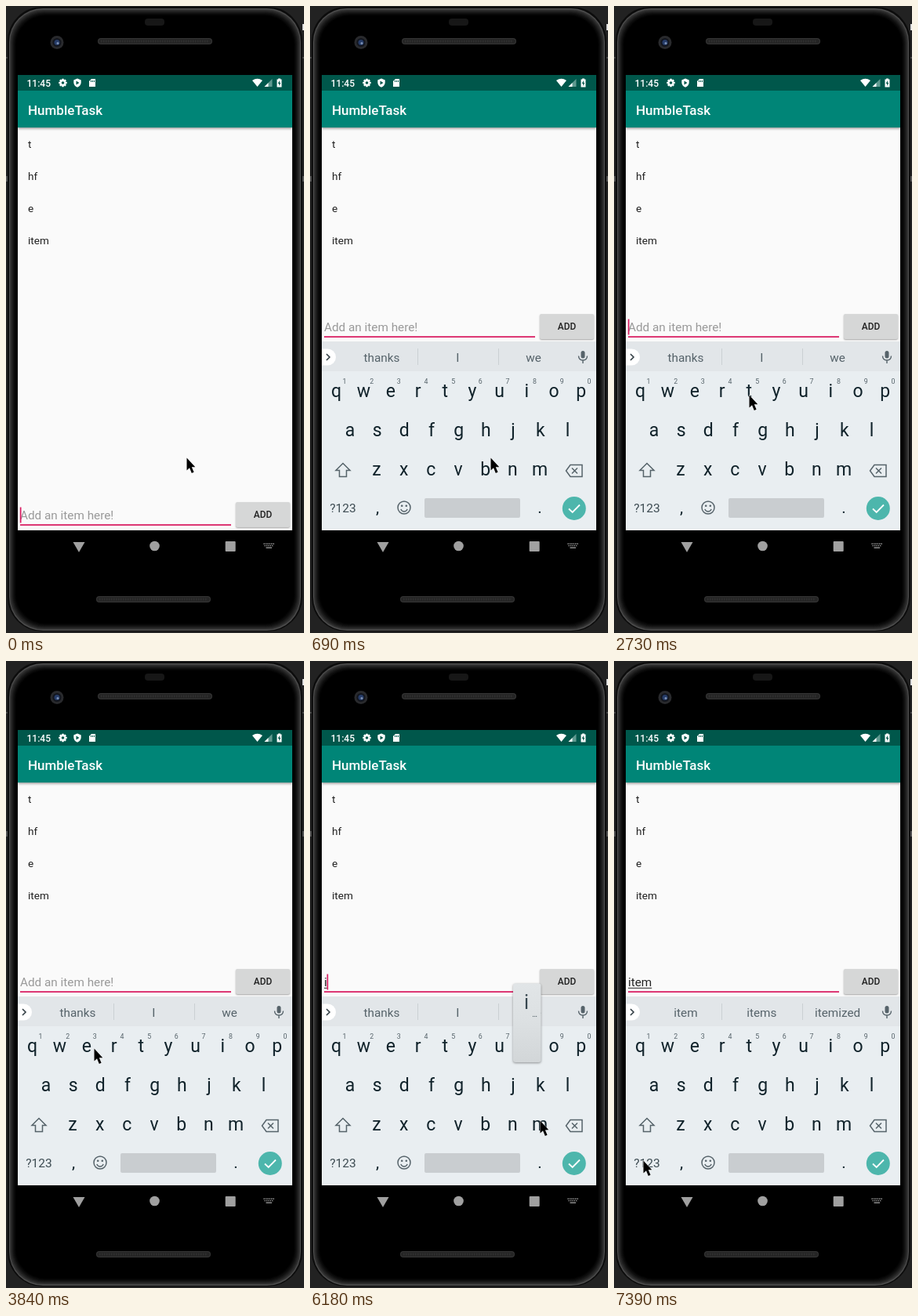
These frames come from a looping animation (380x800 px, 8000 ms). An HTML page with a canvas:

```html
<!DOCTYPE html>
<html lang="en">
<head>
<meta charset="utf-8">
<title>Todo list demo</title>
<style>
html, body { margin: 0; width: 100%; height: 100%; overflow: hidden; background: #1b1b1b; }
canvas { display: block; width: 380px; height: 800px; }
</style>
</head>
<body>
<canvas id="stage" width="380" height="800"></canvas>
<script>
const LOOP = 8000;
const ctx = document.getElementById('stage').getContext('2d');
const INK = '#10222a', SLATE = '#56636a', PINK = '#d81b60';

// Each step: start time, then the value held until the next step.
const pointerSteps = [
  [0, 230, 576], [810, 218, 501], [960, 266, 472], [1110, 272, 482], [1240, 275, 488],
  [1950, 240, 488], [2070, 199, 488], [2220, 184, 490], [2340, 172, 493], [2460, 164, 495],
  [2580, 170, 497], [2730, 172, 496], [3420, 150, 496], [3540, 134, 495], [3690, 120, 494],
  [3840, 112, 494], [3960, 108, 494], [5050, 203, 541], [5170, 233, 557], [5320, 275, 576],
  [5470, 289, 584], [5590, 293, 586], [6730, 230, 600], [6850, 130, 611], [6970, 67, 617],
  [7120, 38, 624], [7270, 36, 632], [7390, 37, 637]
];
const caretSteps = [[0, 1], [150, 0], [810, 1], [3540, 0], [5050, 1], [5170, 0], [5470, 1],
  [6030, 0], [6180, 1], [6970, 0]];
const textSteps = [[0, ''], [5590, 'i'], [6460, 'it'], [6580, 'item']];
const boardSteps = [[0, 0, 0], [400, 60, 0.52], [540, 6, 0.95], [690, 0, 1]];

function at(steps, t) {
  let current = steps[0];
  for (const s of steps) if (s[0] <= t) current = s;
  return current.slice(1);
}

function rect(x, y, w, h, fill, r = 0) {
  ctx.beginPath();
  ctx.roundRect(x, y, w, h, r);
  ctx.fillStyle = fill;
  ctx.fill();
}
function disc(x, y, r, fill) {
  ctx.beginPath();
  ctx.arc(x, y, r, 0, 7);
  ctx.fillStyle = fill;
  ctx.fill();
}
function shape(d, color, width, x = 0, y = 0) {
  ctx.save();
  ctx.translate(x, y);
  const p = new Path2D(d);
  if (width) {
    ctx.strokeStyle = color;
    ctx.lineWidth = width;
    ctx.stroke(p);
  } else {
    ctx.fillStyle = color;
    ctx.fill(p, 'evenodd');
  }
  ctx.restore();
}
function text(s, x, y, size, color, align = 'left', weight = 400) {
  ctx.font = `${weight} ${size}px Roboto, sans-serif`;
  ctx.textAlign = align;
  ctx.fillStyle = color;
  ctx.fillText(s, x, y);
}
function shadowed(blur, dy, alpha, draw) {
  ctx.save();
  ctx.shadowColor = `rgba(0,0,0,${alpha})`;
  ctx.shadowBlur = blur;
  ctx.shadowOffsetY = dy;
  draw();
  ctx.restore();
}
function vertical(y0, y1, ...colors) {
  const g = ctx.createLinearGradient(0, y0, 0, y1);
  colors.forEach((c, i) => g.addColorStop(i / (colors.length - 1), c));
  return g;
}

function grille(x, y) {
  rect(x, y, 146, 8, '#363636', 4);
  rect(x + 1, y + 1, 144, 6, '#252525', 3);
  for (let i = 4; i < 142; i += 3) rect(x + i, y + 2.5, 1.5, 3, '#303030');
}

function phone() {
  rect(0, 0, 380, 800, '#222');
  for (const x of [0, 376]) {
    rect(x, 65, 4, 2, '#4a4a4a');
    rect(x, 217, 4, 7, '#555');
  }
  rect(378, 23, 2, 8, '#ddd');
  rect(2, 1, 376, 797, '#0c0c0c', 44);
  rect(4, 3, 372, 794, '#4c4c4c', 43);
  // The rim darkens softly toward the glass.
  for (let i = 0; i < 9; i++) {
    const level = 52 * (1 - i / 8) ** 1.5;
    rect(5 + i, 4.5 + i, 370 - 2 * i, 791 - 2 * i, `rgb(${level},${level},${level})`, 42 - i / 2);
  }
  rect(177, 16, 25, 9, '#171717', 4);
  disc(65, 46.5, 8.5, '#292a2d');
  disc(65, 46.5, 5.5, '#12151d');
  disc(65, 46.5, 3.5, '#263c68');
  disc(66, 47.5, 1.5, '#7c91b5');
  grille(117, 41);
  grille(115, 753);
}

function statusBar() {
  rect(15, 88, 350, 20, '#00574b');
  text('11:45', 26.5, 102.5, 12, '#fff', 'left', 500);
  ctx.save();
  ctx.translate(72.5, 98);
  for (let i = 0; i < 4; i++) {
    rect(-1.3, -5.2, 2.6, 10.4, '#fff', 0.5);
    ctx.rotate(Math.PI / 4);
  }
  disc(0, 0, 3.8, '#fff');
  disc(0, 0, 1.8, '#00574b');
  ctx.restore();
  shape('M0-5.5L4.7-3.5V0Q4.2 4 0 5.8Q-4.2 4-4.7 0V-3.5ZM-1.5-2.5L2.5 0L-1.5 2.5Z', '#fff', 0, 91, 98);
  shape('M-1-5H4V5H-4V-2ZM-2-3V-1H-1V-3ZM0-3V-1H1V-3ZM2-3V-1H3V-3Z', '#fff', 0, 110, 98);
  shape('M-6.5-3Q0-7.5 6.5-3L0 5Z', '#fff', 0, 320.5, 98);
  shape('M5-5V5H-5Z', '#5f9990', 0, 334.5, 98);
  shape('M0 0V5H-5Z', '#fff', 0, 334.5, 98);
  shape('M-1.4-5.5H1.4V-4.5H3V5.5H-3V-4.5H-1.4ZM.5-3L-1.8 1H-.4V4L1.8 0H.5Z', '#fff', 0, 348.5, 98);
}

function app(typed, caret, lifted) {
  rect(15, 108, 350, 561, '#fafafa');
  shadowed(3, 1.5, 0.4, () => rect(15, 108, 350, 47, '#008577'));
  statusBar();
  text('HumbleTask', 28, 138.5, 17, '#fff', 'left', 500);
  ['t', 'hf', 'e', 'item'].forEach((s, i) => text(s, 28, 181 + i * 41, 13.6, '#222'));

  ctx.save();
  ctx.translate(0, lifted ? 0 : 240);
  text(typed || 'Add an item here!', 18, 415, 15.3, typed ? '#222' : '#999');
  const width = typed ? ctx.measureText(typed).width : 0;
  if (typed) rect(18, 416.8, width, 1, '#222');
  rect(18, 421.3, 269, 1.7, PINK);
  if (caret) rect(17.8 + width, 399.5, 1.7, 20, PINK);
  shadowed(2, 1, 0.35, () => rect(293, 393, 69, 32, '#d6d7d7', 2));
  text('ADD', 327.5, 413, 11.9, '#222', 'center', 500);
  ctx.restore();
}

function suggestions(words) {
  rect(15, 428, 350, 38, '#e2e6e9');
  rect(7, 437.5, 26, 21, '#fff', 10.5);
  shape('M21 444L25 448L21 452', '#333f45', 1.6);
  words.forEach((w, i) => text(w, 91.5 + i * 96.8, 453.7, 15.3, SLATE, 'center'));
  for (const x of [137, 240]) rect(x, 437, 1, 21, '#cbd0d3');
  rect(345.5, 440, 5, 9.5, SLATE, 2.5);
  shape('M342.5 446.5Q342.7 451.8 348 452Q353.3 451.8 353.5 446.5M348 452V456', SLATE, 1.4);
}

function keyRow(letters, x, y) {
  [...letters].forEach((c, i) => text(c, x + i * 34.68, y, 23, INK, 'center'));
}

function keyboard(offset, alpha, words, top, bottom) {
  ctx.save();
  ctx.beginPath();
  ctx.rect(15, top, 350, bottom - top);
  ctx.clip();
  ctx.translate(0, offset);
  ctx.globalAlpha = alpha;
  rect(15, 466, 350, 203, '#e9eef1');
  suggestions(words);
  keyRow('qwertyuiop', 33.6, 499);
  [...'1234567890'].forEach((d, i) => text(d, 44 + i * 34.65, 481.5, 8.8, SLATE, 'center'));
  keyRow('asdfghjkl', 51, 549);
  keyRow('zxcvbnm', 85, 599);
  shape('M42 583.5L51 592.5H46.5V600.5H37.5V592.5H33Z', SLATE, 1.5);
  shape('M332 585.5H347V600.5H332L326.5 593ZM334 589.5L341 596.5M341 589.5L334 596.5', SLATE, 1.5);
  text('?123', 42, 646, 15.5, '#3c4a51', 'center');
  text(',', 86, 647, 21, INK, 'center');
  text('.', 293, 647, 21, INK, 'center');
  ctx.beginPath();
  ctx.arc(120, 640, 8, 0, 7);
  ctx.strokeStyle = SLATE;
  ctx.lineWidth = 1.5;
  ctx.stroke();
  disc(117.2, 637.7, 1.3, SLATE);
  disc(122.8, 637.7, 1.3, SLATE);
  shape('M115.8 642Q117.2 645 120 645Q122.8 645 124.2 642', SLATE, 1.4);
  rect(146, 628, 122, 25, '#c9cdd0', 2);
  disc(336.8, 641, 15, '#4db6ac');
  shape('M330 641.5L334.7 646L344 636.5', '#fff', 1.8);
  ctx.restore();
}

function navBar(tinted) {
  const gray = tinted ? '#c3c3c3' : '#a0a0a0';
  shape('M85.5 684H100.5L93 697Z', gray);
  disc(189.5, 689, 6.3, gray);
  rect(279.7, 683, 13, 13, gray, 1);
  for (let row = 0; row < 2; row++)
    for (let i = 0; i < 6 - row; i++) rect(328.5 + row + i * 2.4, 685.5 + row * 2.4, 1.4, 1.4, gray);
  rect(331.5, 690.6, 7.5, 1.3, gray);
}

function keyPopup() {
  shadowed(3, 1, 0.4, () => rect(259, 411.5, 35.5, 100.5, vertical(411, 512, '#e1e5e7', '#dce0e2', '#d2d6d8'), 3));
  text('i', 276, 444, 25, '#37474f', 'center');
  text('…', 286.5, 454, 10, '#37474f', 'center');
}

function pointer(x, y) {
  ctx.lineJoin = 'round';
  const arrow = 'M.5.5V16.5L4 13.3L6.8 20L9.6 18.8L6.8 12.3H11.3Z';
  shape(arrow, 'rgba(255,255,255,.75)', 1, x, y);
  shape(arrow, '#000', 0, x, y);
  ctx.lineJoin = 'miter';
}

function draw(t) {
  const [caret] = at(caretSteps, t);
  const [typed] = at(textSteps, t);
  const [offset, alpha] = at(boardSteps, t);
  const words = t >= 6730 ? ['item', 'items', 'itemized'] : ['thanks', 'I', 'we'];
  phone();
  app(typed, caret, t >= 150);
  rect(15, 669, 350, 41, '#000');
  if (alpha) keyboard(offset, alpha, words, 155, 669);
  if (offset) {
    // The rising keyboard shows through the half-dark navigation bar.
    keyboard(offset, 1, words, 669, 710);
    rect(15, 669, 350, 41, 'rgba(0,0,0,.5)');
  }
  navBar(offset);
  if (t >= 6180 && t < 6460) keyPopup();
  pointer(...at(pointerSteps, t));
}

const start = performance.now();
function tick() {
  draw((performance.now() - start) % LOOP);
  requestAnimationFrame(tick);
}
tick();
</script>
</body>
</html>
```
